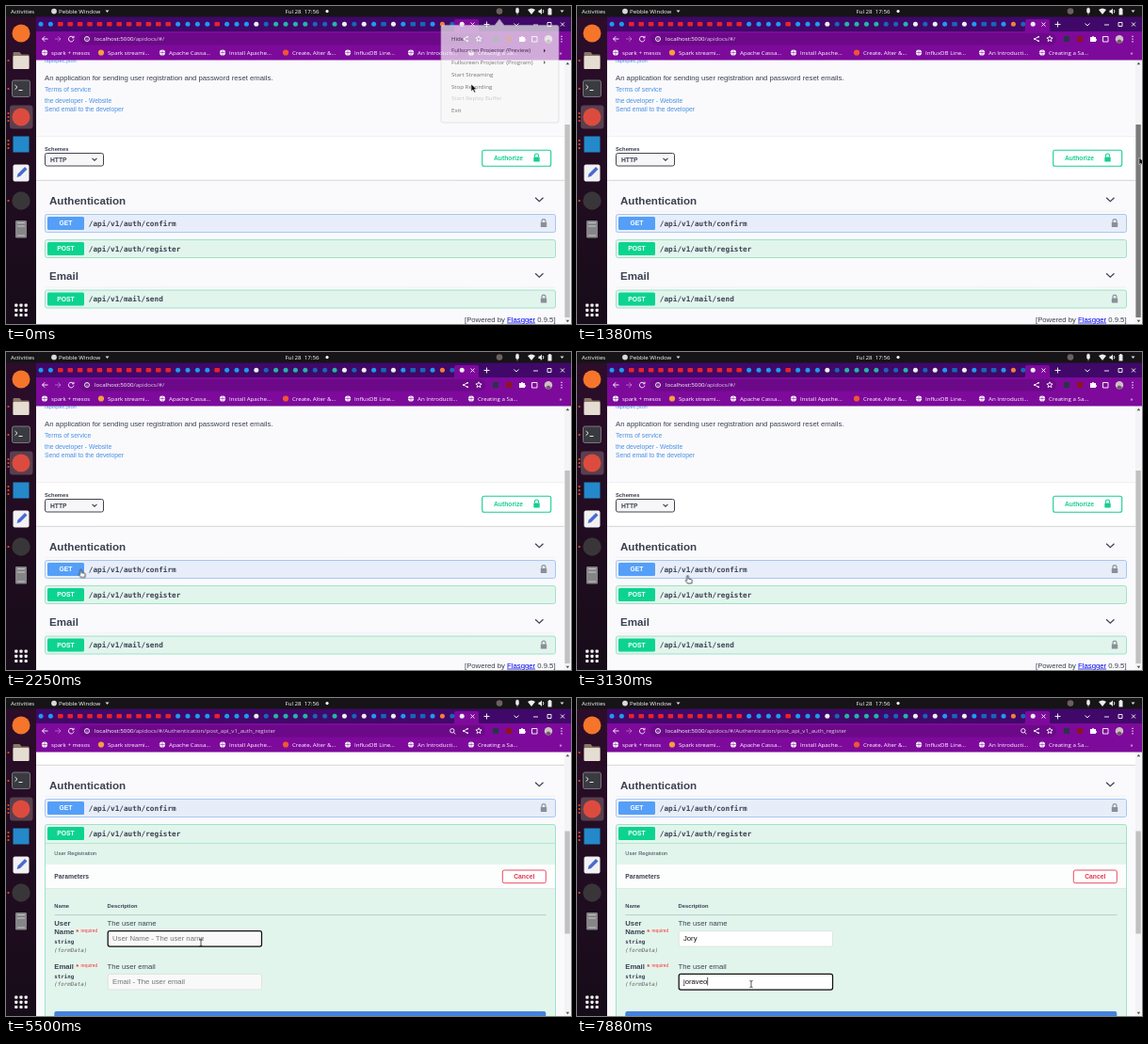
These frames come from a looping animation (600 px wide and 338 px high, 8000 ms). An HTML page:

```html
<!DOCTYPE html>
<html lang="en">
<head>
<meta charset="utf-8">
<title>API docs walkthrough</title>
<style>
html, body { margin: 0; width: 100%; height: 100%; overflow: hidden; background: #fafafa; }
svg { display: block; width: 600px; height: 338px; }
text { font: 6.76px "Liberation Sans", Arial, sans-serif; fill: #3b4151; white-space: pre; }
.ui text { font: 500 6.15px "Open Sans", "Noto Sans", sans-serif; fill: #fff; }
.b { font-weight: 700; }
.s { font-size: 5.8px; }
.l { font-size: 7.73px; }
.h { font-size: 11.6px; font-weight: 700; }
.link { fill: #4990e2; }
.mid { text-anchor: middle; }
.white { fill: #fff; }
.red { fill: #f33; }
.hint { fill: #757575; }
.typed { fill: #111; font-size: 7.7px; }
.mono { font: 700 7.73px "DejaVu Sans Mono", monospace; }
.type { font: 700 5.8px "DejaVu Sans Mono", monospace; }
.in { font: italic 5.8px "DejaVu Sans Mono", monospace; fill: #666; }
.line { fill: none; stroke: #3b4151; }
.ico { fill: none; stroke: #fff; stroke-width: .9; }
.ring { fill: none; stroke: #111; stroke-width: 1.25; }

/* motion */
.scroll { animation: scroll 8s infinite; }
@keyframes scroll {
  0%, 45.8% { transform: none; }
  49.2%, 100% { transform: translateY(-114px); }
}
.thumb { animation: thumb 8s linear infinite; }
@keyframes thumb {
  0%, 8% { y: 126px; height: 205px; fill: #c1c1c1; }
  9%, 22% { y: 126px; height: 205px; fill: #7a7a7a; }
  23%, 42.24% { y: 126px; height: 205px; fill: #c1c1c1; }
  42.25%, 45% { y: 97px; height: 112px; fill: #c1c1c1; }
  45.8% { y: 97px; height: 112px; fill: #7a7a7a; }
  49.2%, 53% { y: 143.5px; height: 112px; fill: #7a7a7a; }
  54%, 58.74% { y: 143.5px; height: 112px; fill: #c1c1c1; }
  58.75%, 100% { y: 141.5px; height: 109px; fill: #c1c1c1; }
}
.pointer { animation: move 8s ease-in-out infinite; }
@keyframes move {
  0%, 3% { transform: translate(494px, 83px); }
  11%, 14% { transform: translate(597px, 154px); }
  16%, 20% { transform: translate(597px, 161px); }
  26.5%, 30% { transform: translate(79.5px, 231.5px); }
  36%, 39.5% { transform: translate(117.5px, 238px); }
  41.2%, 42.6% { transform: translate(118px, 255px); }
  45.6% { transform: translate(597px, 173px); }
  49.2%, 52% { transform: translate(597px, 219px); }
  57.5%, 59.5% { transform: translate(547px, 190px); }
  66%, 79% { transform: translate(207px, 260px); }
  83.5%, 100% { transform: translate(185px, 304px); }
}
.menu { animation: fade 8s step-end infinite; }
@keyframes fade { 0% { opacity: .68; } 1.62% { opacity: .2; } 3.1%, 100% { opacity: 0; } }

/* hard switches */
.closed, .open, .try, .cancel, .focus1, .focus2, .arrow, .hand, .beam { animation: closed 8s step-end infinite; }
@keyframes closed { 0% { visibility: visible; } 42.25%, 100% { visibility: hidden; } }
.open { animation-name: open; }
@keyframes open { 0% { visibility: hidden; } 42.25%, 100% { visibility: visible; } }
.try { animation-name: try; }
@keyframes try { 0% { visibility: hidden; } 42.25% { visibility: visible; } 58.75%, 100% { visibility: hidden; } }
.cancel { animation-name: cancel; }
@keyframes cancel { 0% { visibility: hidden; } 58.75%, 100% { visibility: visible; } }
.focus1 { animation-name: focus1; }
@keyframes focus1 { 0% { visibility: hidden; } 66.9% { visibility: visible; } 84.4%, 100% { visibility: hidden; } }
.focus2 { animation-name: focus2; }
@keyframes focus2 { 0% { visibility: hidden; } 84.4%, 100% { visibility: visible; } }
.arrow { animation-name: arrow; }
@keyframes arrow {
  0% { visibility: visible; } 25.5% { visibility: hidden; } 43.4% { visibility: visible; }
  56.5% { visibility: hidden; } 60.2% { visibility: visible; } 65%, 100% { visibility: hidden; }
}
.hand { animation-name: hand; }
@keyframes hand {
  0% { visibility: hidden; } 25.5% { visibility: visible; } 43.4% { visibility: hidden; }
  56.5% { visibility: visible; } 60.2%, 100% { visibility: hidden; }
}
.beam { animation-name: beam; }
@keyframes beam { 0% { visibility: hidden; } 65%, 100% { visibility: visible; } }
</style>
</head>
<body>
<svg viewBox="0 0 600 338">
  <defs>
    <linearGradient id="dockFill" x2="0" y2="1">
      <stop stop-color="#2c0d2a"/><stop offset="1" stop-color="#170c19"/>
    </linearGradient>
    <clipPath id="view"><path d="M32 57.5H600V338H32z"/></clipPath>
    <g id="lock">
      <path d="M-2-.8V-2.4a2 2 0 0 1 4 0V-.8" fill="none" stroke="currentColor" stroke-width="1.1"/>
      <rect x="-3.2" y="-1" width="6.4" height="5" rx=".6" fill="currentColor"/>
    </g>
    <path id="chev" class="line" d="M-4.2-2 0 2 4.2-2" stroke-width="1.2"/>
    <g id="globe">
      <circle r="3.1" fill="#fff"/>
      <path d="M-3 0H3M0-3V3" stroke="#7d0a9b" stroke-width=".5"/>
    </g>
  </defs>

  <!-- page -->
  <g clip-path="url(#view)">
    <rect x="32" y="57" width="568" height="281" fill="#fafafc"/>
    <g class="scroll">
      <text class="s link" x="41" y="60.3">/apispec.json</text>
      <text class="l" x="41" y="79.2">An application for sending user registration and password reset emails.</text>
      <text class="link" x="41" y="91.2">Terms of service</text>
      <text class="link" x="41" y="102.6">the developer - Website</text>
      <text class="link" x="41" y="111.6">Send email to the developer</text>

      <rect x="32" y="138" width="561" height="47" fill="#fff"/>
      <path d="M32 138.5H593" stroke="#f0f0f2"/>
      <path d="M32 185.3H593" stroke="#d5d5d9"/>
      <text class="s b" x="41" y="154.4">Schemes</text>
      <rect x="41.5" y="156.5" width="62" height="13.5" rx="2" fill="#f7f7f7" stroke="#41444e"/>
      <text class="b" x="47" y="165.6">HTTP</text>
      <path class="line" d="m91.5 161.8 2.5 2.4 2.5-2.4" stroke-width="1.1"/>
      <rect x="505.7" y="153.2" width="73" height="17" rx="2" fill="#fff" stroke="#14d08f" stroke-width="1.1"/>
      <text class="b" x="518" y="164.2" style="fill:#14d08f">Authorize</text>
      <use href="#lock" x="563.5" y="161.4" color="#14d08f"/>

      <rect class="open" x="41.5" y="248.5" width="542" height="300" rx="2" fill="#e2f5ed" stroke="#8adfbb" stroke-width=".8"/>
      <g id="page"></g>

      <g class="closed">
        <text class="l" x="487" y="335.6">[Powered by <tspan fill="#00e" text-decoration="underline">Flasgger</tspan> 0.9.5]</text>
      </g>

      <g class="open">
        <path d="M42 268.5H583" stroke="#a5e5cb" stroke-width=".8"/>
        <text class="s" x="51.3" y="281">User Registration</text>
        <rect x="42" y="316" width="541" height="1" fill="#cfe0d9"/>
        <rect x="42" y="291" width="541" height="25.3" fill="#fcfefd"/>
        <text class="b" x="51.3" y="306">Parameters</text>
        <text class="s b" x="51.3" y="336.6">Name</text>
        <text class="s b" x="107.6" y="336.6">Description</text>
        <path d="M51.5 344.6H573.5" stroke="#a9bcb5" stroke-width=".7"/>
        <text class="l b" x="51.3" y="356.4">User</text>
        <g id="fields"></g>
      </g>
      <g class="try">
        <rect x="521.2" y="297.2" width="52" height="13.3" rx="2" fill="#fff" stroke="#707580"/>
        <text class="b mid" x="547.2" y="306.2">Try it out</text>
      </g>
      <g class="cancel">
        <rect x="527.3" y="297" width="46" height="13.7" rx="2" fill="#fff" stroke="#ea4a62"/>
        <text class="b mid" x="550.3" y="306.2" style="fill:#e2354f">Cancel</text>
        <rect x="51.3" y="447" width="522" height="19" rx="2" fill="#4482dc"/>
        <text class="typed" id="name" x="113" y="372"></text>
        <text class="typed" id="mail" x="113" y="417.8"></text>
        <rect id="caret" width=".7" height="8.6" fill="#111"/>
      </g>
      <rect class="ring focus1" x="108.2" y="361.5" width="163.3" height="16.6" rx="2"/>
      <rect class="ring focus2" x="108.2" y="407.4" width="163.3" height="16.6" rx="2"/>
    </g>
    <rect x="593" y="57" width="7" height="281" fill="#f4f4f6"/>
    <path d="M594.6 62.2h3.6l-1.8-2.4zM594.6 333.8h3.6l-1.8 2.4z" fill="#555"/>
    <rect class="thumb" x="593.4" y="126" width="5.4" height="205"/>
  </g>

  <!-- browser frame -->
  <g class="ui">
    <rect width="600" height="12" fill="#161416"/>
    <rect x="32" y="11.5" width="568" height="16" fill="#400869"/>
    <path d="M474 27.5q2 0 2-3V16q0-2 2-2H500q2 0 2 2V24.5q0 3 2 3z" fill="#7d0a9b"/>
    <rect x="32" y="27" width="568" height="30.5" fill="#7d0a9b"/>
    <rect x="78" y="29" width="431" height="12.5" rx="6.2" fill="#6c0988"/>
    <g id="tabs"></g>
    <path class="ico" d="m493.5 17.5 4 4m0-4-4 4M507.500 19.5h6m-3-3v6M539.5 18.5l2.500 2.500 2.500-2.500M560 20h5M575 17.500h4v4h-4zM589 17.500l4 4m0-4-4 4"/>

    <path class="ico" d="M44.5 35H38.5m2.8-2.8L38.5 35l2.8 2.8"/>
    <path class="ico" opacity=".4" d="M52 35h6m-2.8-2.8L58 35l-2.8 2.8"/>
    <path class="ico" d="M71.3 33.2A2.8 2.8 0 1 0 72 35.5M72 31.8v2h-2"/>
    <circle class="ico" cx="86" cy="35" r="2.5"/>
    <path d="M86 34.7v1.7M86 33.4v.6" stroke="#fff" stroke-width=".7"/>
    <text class="closed" x="94" y="37.2">localhost:5000<tspan fill="#e0cbe8">/apidocs/#/</tspan></text>
    <text class="open" x="94" y="37.2">localhost:5000<tspan fill="#e0cbe8">/apidocs/#/Authentication/post_api_v1_auth_register</tspan></text>
    <path class="ico open" d="M475.5 36.5l1.8 1.8M476 34.8a2.2 2.2 0 1 1-4.4 0a2.2 2.2 0 0 1 4.4 0z"/>
    <path class="ico" d="M485.8 35 490 32.8M485.8 35 490 37.2" stroke-width=".7"/>
    <path d="M485 34.2h1.6v1.6H485zM489.300 32h1.600v1.600h-1.600zM489.300 36.400h1.600v1.600h-1.600z" fill="#fff"/>
    <path class="ico" d="m502 31.8.9 2 2.2.2-1.7 1.4.5 2.2-1.9-1.2-1.9 1.2.5-2.2-1.7-1.400 2.200-.2z"/>
    <rect x="517" y="32" width="6" height="6" fill="#283547"/>
    <rect x="531" y="32" width="6" height="6" fill="#8e1420"/>
    <path d="M545 33h2a1 1 0 0 1 2 0h2v2a1 1 0 0 1 0 2v1h-6z" fill="#fff"/>
    <path class="ico" d="M558.5 32.5h5.5v5.5h-5.5z"/>
    <circle cx="576" cy="35.2" r="4.2" fill="#cdbfc4"/>
    <path d="M573 38q3-5 6 0q-3 2.5-6 0" fill="#6c5a62"/>
    <path d="M590 31.8v1.2m0 1.5v1.2m0 1.5v1.2" stroke="#fff" stroke-width="1.2"/>
    <g id="marks"></g>
    <text x="587.5" y="51.7">»</text>

    <!-- system bar -->
    <text x="5" y="7.9">Activities</text>
    <circle cx="51" cy="5.6" r="2.9" fill="#d9d9d9"/>
    <text x="56" y="7.9">Pebble Window</text>
    <path d="M105.500 4.500h4L107.500 7z" fill="#ddd"/>
    <text x="296.500" y="7.9">Ful 28  17:56</text>
    <circle cx="341" cy="5.6" r="1.6" fill="#fff"/>
    <circle cx="524" cy="5.6" r="3.3" fill="#6d5f60"/>
    <path d="M541.5 3.5a1.500 1.500 0 0 1 3 0V6a1.500 1.500 0 0 1-3 0zM543 7.500V9.500" fill="#eee" stroke="#eee" stroke-width=".5"/>
    <path d="M554 4q4-3 8 0L558 9zM565.500 4.500h1.500l2-2v6.500l-2-2h-1.500zM575.500 3h1V2h2v1h1v6.500h-4z" fill="#eee"/>
    <path class="ico" d="M570.2 4q1.3 1.7 0 3.4"/>
    <path d="M588.500 4.500h4L590.500 7z" fill="#ddd"/>
  </g>

  <!-- dock -->
  <rect y="11.5" width="32" height="326.5" fill="url(#dockFill)"/>
  <rect x="4" y="105.5" width="24.5" height="25" rx="3" fill="#59404f"/>
  <circle cx="16" cy="29" r="9.5" fill="#f5752b"/>
  <path d="M7.5 50q0-1 1-1h6l2 2.5h7q1 0 1 1V66q0 1-1 1h-15q-1 0-1-1z" fill="#8a7768"/>
  <rect x="7.5" y="53" width="17" height="14" rx="1" fill="#e5ddd2"/>
  <rect x="6.5" y="79" width="19" height="17.5" rx="2" fill="#3a3b40" stroke="#8d8d92" stroke-width=".8"/>
  <path class="ico" d="m9.5 84 2.5 2.3-2.5 2.3M13.5 89.5h4"/>
  <circle cx="16" cy="118" r="9.5" fill="#dd4b3e"/>
  <rect x="7.5" y="138.5" width="17" height="17" fill="#2489ca"/>
  <rect x="7.5" y="168.5" width="17" height="18" rx="2" fill="#f2f2f5"/>
  <path d="m11.5 182 1-3.5 7.5-7.5 2.5 2.5-7.5 7.5z" fill="#4a6ad0"/>
  <circle cx="16" cy="207" r="9.7" fill="#393639"/>
  <rect x="10" y="228" width="12" height="18.5" rx="1.2" fill="#858588"/>
  <path d="M12 230.5h8M12 234h8M12 244h8" stroke="#c8c8ca"/>
  <g id="dock" fill="#e95420"></g>
  <g id="grid" fill="#f2f2f2"></g>

  <!-- tray menu -->
  <g class="menu ui">
    <path d="M464 20.5H519L524 14l5 6.5H585q2 0 2 2V122q0 2-2 2H464q-2 0-2-2V22.5q0-2 2-2z" fill="#f8f8f8" stroke="#c8c8c8" stroke-width=".7"/>
    <g id="items"></g>
    <path d="M571 45.5v4l2-2zM571 58v4l2-2z" fill="#333"/>
  </g>

  <g class="pointer">
    <path class="arrow" d="M0 0V7.8l1.9-1.7 1.3 2.9 1.4-.6-1.3-2.8h2.5z" fill="#111" stroke="#fff" stroke-width=".5"/>
    <path class="hand" d="M-.8 0q.9-.9 1.7 0V3l3 .7q1 .3.9 1.3L4.3 8H0L-2.3 4.8q.4-1 1.5 0z" fill="#fff" stroke="#111" stroke-width=".7"/>
    <path class="beam" d="M-1.6-3.5Q0-3.5 0-2.5Q0-3.5 1.6-3.5M0-2.5V2.8M-1.6 3.7Q0 3.7 0 2.7Q0 3.7 1.6 3.7" fill="none" stroke="#111" stroke-width=".7"/>
  </g>
</svg>
<script>
const $ = id => document.getElementById(id);
const fill = (id, list, make) => { $(id).innerHTML = list.map(make).join(''); };
const esc = s => s.replace(/&/g, '&amp;');

// Tab icons: r/b/t/w/o/n = colours; upper case draws a rectangle.
const tint = { r: '#e8212b', b: '#1d9bf0', t: '#25b5a6', w: '#eee', o: '#f0803c', n: '#1667b8' };
fill('tabs', [...'bbRRRRRRRRRRRRbbbbRbbbwnttttnntwnwbNwbNNbonw'], (c, i) => {
  const x = 37 + i * 10.4, color = tint[c.toLowerCase()];
  return c < 'a'
    ? `<rect x="${x - 2.8}" y="17" width="5.6" height="4.4" rx="1" fill="${color}"/>`
    : `<circle cx="${x}" cy="19.2" r="2.5" fill="${color}"/>`;
});

fill('marks', [
  [41, 'spark + mesos'], [101, 'Spark streami...', '#f2a03d'], [166, 'Apache Cassa...'],
  [230, 'Install Apache...'], [297, 'Create, Alter &...', '#f0562f'], [363, 'InfluxDB Line...'],
  [430, 'An Introducti...'], [494, 'Creating a Sa...']
], ([x, label, color]) =>
  (color ? `<circle cx="${x}" cy="49.5" r="3.1" fill="${color}"/>` : `<use href="#globe" x="${x}" y="49.5"/>`) +
  `<text x="${x + 7}" y="51.7">${esc(label)}</text>`);

fill('items', ['Hide', 'Fullscreen Projector (Preview)', 'Fullscreen Projector (Program)',
  'Start Streaming', 'Stop Recording', 'Start Replay Buffer', 'Exit'], (label, i) =>
  `<text x="473" y="${36.7 + i * 12.75}" style="fill:${i === 5 ? '#b5b5b5' : '#333'}">${label}</text>`);

const dots = (x, y, n) => Array.from({ length: n }, (_, i) =>
  `<circle cx="${x}" cy="${y + (i - (n - 1) / 2) * 4}" r="1.1"/>`).join('');
fill('dock', [[58, 1], [88, 1], [118, 3], [147, 3], [207, 1]], ([y, n]) => dots(2.5, y, n));
fill('grid', [...Array(9).keys()], i =>
  `<rect x="${9.2 + i % 3 * 5.2}" y="${316.5 + Math.floor(i / 3) * 5.2}" width="3.2" height="3.2" rx=".8"/>`);

// Sections and endpoint rows
const looks = {
  GET: { main: '#559ff8', pale: '#e7eef9', edge: '#94baf1' },
  POST: { main: '#0cd390', pale: '#e2f5ed', edge: '#8adfbb' }
};
const head = (y, label) =>
  `<text class="h" x="46" y="${y + 4.7}">${label}</text><use href="#chev" x="566.3" y="${y - .3}"/>
   <path d="M41 ${y + 12.3}H583" stroke="#e9e9ec" stroke-width=".5"/>`;
const box = (y, verb) =>
  `<rect x="41.5" y="${y - 9.5}" width="542" height="19" rx="2" fill="${looks[verb].pale}" stroke="${looks[verb].edge}" stroke-width=".8"/>`;
const label = (y, verb, path) =>
  `<rect x="44" y="${y - 7}" width="39" height="14" rx="1.5" fill="${looks[verb].main}"/>
   <text class="b mid white" x="63.5" y="${y + 2.4}">${verb}</text>
   <text class="mono" x="87.8" y="${y + 2.7}">${path}</text>`;
const lock = y => `<use href="#lock" x="571" y="${y}" color="#8a8f96"/>`;

$('page').innerHTML =
  head(206, 'Authentication') + box(231, 'GET') + label(231, 'GET', '/api/v1/auth/confirm') + lock(231) +
  `<g class="closed">${box(258, 'POST')}</g>` + label(258, 'POST', '/api/v1/auth/register') +
  `<g class="closed">${head(286.5, 'Email')}${box(311.5, 'POST')}${label(311.5, 'POST', '/api/v1/mail/send')}${lock(311.5)}</g>`;

fill('fields', [
  [365.2, 'Name', 356.4, 361.6, 'The user name', 'User Name - The user name', 'hint1'],
  [402, 'Email', 402, 407.4, 'The user email', 'Email - The user email', 'hint2']
], ([y, name, top, frame, note, hint, id]) =>
  `<text class="l b" x="51.3" y="${y}">${name}</text>
   <text class="l b red" x="74.2" y="${y}">*</text>
   <text class="red" x="79.5" y="${y - 2.5}" style="font-size:4.8px">required</text>
   <text class="type" x="51.3" y="${y + 10}">string</text>
   <text class="in" x="51.3" y="${y + 18.4}">(formData)</text>
   <text class="l" x="107.6" y="${top}">${note}</text>
   <rect id="${id}-box" x="108.2" y="${frame}" width="163.3" height="16.5" rx="2" fill="#f9f9f9" stroke="#d5dbd8" stroke-width=".7"/>
   <text class="l hint" id="${id}" x="113" y="${frame + 10.4}">${hint}</text>`);

// Typing
const LOOP = 8000;
const entries = [
  { el: $('name'), hint: $('hint1'), frame: $('hint1-box'), word: 'Jory', start: 5800, step: 150, from: 5650, to: 6750 },
  { el: $('mail'), hint: $('hint2'), frame: $('hint2-box'), word: 'joraveo', start: 6900, step: 145, from: 6750, to: LOOP }
];
function draw() {
  const t = performance.now() % LOOP;
  let caretOn = false;
  for (const e of entries) {
    const count = Math.max(0, Math.floor((t - e.start) / e.step) + 1);
    e.el.textContent = e.word.slice(0, count);
    e.hint.style.display = count ? 'none' : '';
    e.frame.style.fill = count ? '#fff' : '';
    if (t >= e.from && t < e.to) {
      caretOn = true;
      $('caret').setAttribute('x', 113.2 + (count ? e.el.getComputedTextLength() : 0));
      $('caret').setAttribute('y', e.el.getAttribute('y') - 7);
    }
  }
  $('caret').style.display = caretOn ? '' : 'none';
  requestAnimationFrame(draw);
}
draw();
</script>
</body>
</html>
```
